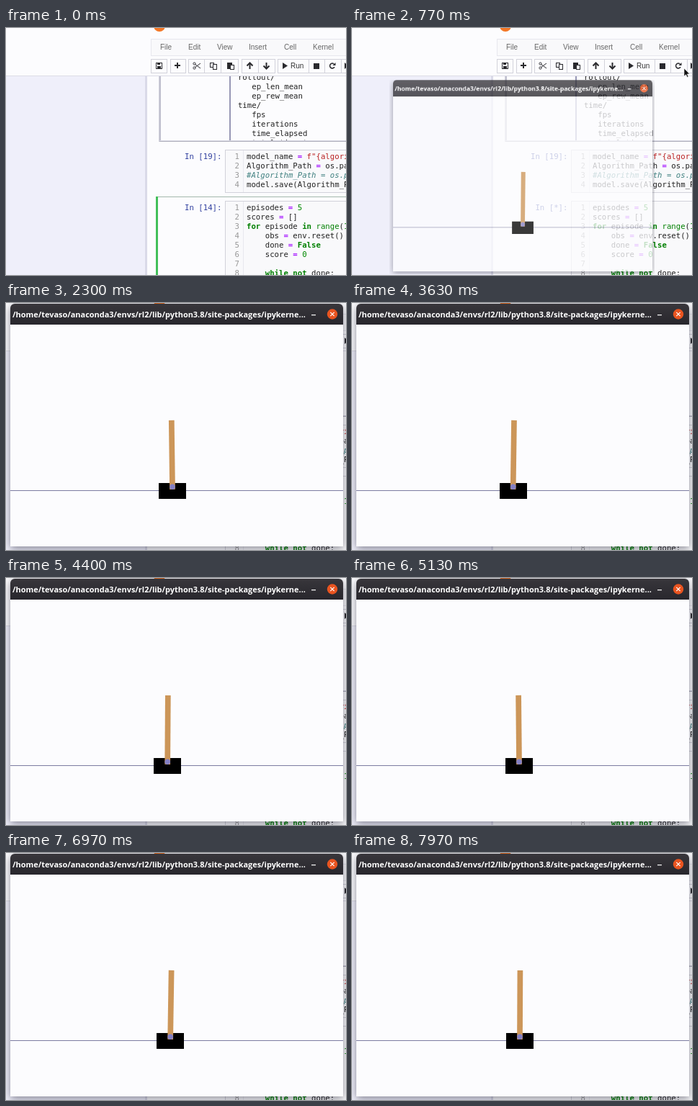
Animation, 472 px wide and 343 px high, one loop 8 s. Source, as an HTML page with a canvas:

```html
<!DOCTYPE html>
<html lang="en">
<head>
<meta charset="utf-8">
<title>Cart and pole</title>
<style>
html, body { margin: 0; width: 100%; height: 100%; overflow: hidden; background: #fcfcfe; }
canvas { display: block; }
</style>
</head>
<body>
<canvas id="stage" width="472" height="343"></canvas>
<script>
const W = 472, H = 343, LOOP = 8000;
const RUN_AT = 500, OPEN_AT = 738.5, OPEN_TIME = 150;
const MONO = '"DejaVu Sans Mono", monospace';
const SANS = '"Liberation Sans", Arial, sans-serif';
const PAPER = '#fcfcfe';
const TITLE = '/home/tevaso/anaconda3/envs/rl2/lib/python3.8/site-packages/ipykerne...';

const stage = document.getElementById('stage').getContext('2d');
const layer = document.createElement('canvas');
layer.width = W;
layer.height = H;
const win = layer.getContext('2d');

// time, cart centre, sideways offset of the pole tip
const POSES = [
  [737, 237, 0.9], [830, 237, 0.8], [1500, 234, 0], [2300, 231, -1.2],
  [3330, 227.2, 0], [3630, 223.7, 1.3], [4050, 222.2, 1], [4600, 226, 0.3],
  [5130, 232, -0.9], [5600, 235, -1], [5870, 234.6, -0.8], [6300, 228, 0],
  [6600, 225.5, 1.2], [6970, 228.2, 1.4], [7400, 233.5, -0.3], [7970, 233, 0.4]
];

const CODE_A = [
  'model_name = f"{algorithm}"',
  'Algorithm_Path = os.path.join(',
  '#Algorithm_Path = os.path',
  'model.save(Algorithm_Path)'
];
const CODE_B = [
  'episodes = 5', 'scores = []', 'for episode in range(1, ',
  '    obs = env.reset()', '    done = False', '    score = 0', '',
  '    while not done:'
];
const OUTPUT = ['rollout/', '   ep_len_mean', '   ep_rew_mean', 'time/', '   fps',
  '   iterations', '   time_elapsed', '   total_timesteps'];

function rect(c, x, y, w, h, color) {
  c.fillStyle = color;
  c.fillRect(x, y, w, h);
}

function frame(c, x, y, w, h, color) {
  c.strokeStyle = color;
  c.lineWidth = 1;
  c.strokeRect(x + 0.5, y + 0.5, w, h);
}

function disc(c, x, y, r, color) {
  c.fillStyle = color;
  c.beginPath();
  c.arc(x, y, r, 0, Math.PI * 2);
  c.fill();
}

function text(c, str, x, y, font, color) {
  c.font = font;
  c.fillStyle = color;
  c.fillText(str, x, y);
}

function poly(c, points, color) {
  c.fillStyle = color;
  c.beginPath();
  for (const [x, y] of points) c.lineTo(x, y);
  c.fill();
}

function line(c, points, color, width) {
  c.strokeStyle = color;
  c.lineWidth = width;
  c.beginPath();
  for (const [x, y] of points) c.lineTo(x, y);
  c.stroke();
}

function tokenStyle(token) {
  if (token[0] === '#') return ['italic ', '#408080'];
  if (/^f?"/.test(token)) return ['', '#ba2121'];
  if (/^(for|in|while|not|False)$/.test(token)) return ['bold ', '#008000'];
  if (token === 'range') return ['', '#008000'];
  if (token === '=') return ['bold ', '#aa22ff'];
  if (/^\d/.test(token)) return ['', '#008800'];
  return ['', '#222'];
}

function codeLine(str, x, y) {
  const step = 6.43;
  for (const m of str.matchAll(/#.*|f"[^"]*"|\w+|[^\s\w]/g)) {
    const [weight, color] = tokenStyle(m[0]);
    text(stage, m[0], x + m.index * step, y, weight + '10.7px ' + MONO, color);
  }
}

function codeCell(label, lines, top, height) {
  const font = '10.7px ' + MONO;
  rect(stage, 304, top, 180, height, '#f9f9fb');
  frame(stage, 304, top, 180, height, '#d2d2da');
  rect(stage, 329, top + 1, 1, height - 1, '#e8e8ee');
  text(stage, label, 248, top + 13, font, '#303f9f');
  lines.forEach((str, i) => {
    const y = top + 13 + i * 13;
    text(stage, i + 1, 317.5, y, font, '#999');
    codeLine(str, 334, y);
  });
}

function toolbar() {
  const ink = '#2a2a2e', c = stage;
  const buttons = [[201, 22], [228, 21], [253, 22], [275, 23], [298, 24], [327, 23],
    [350, 23], [377, 43], [420, 22], [442, 23], [465, 23]];
  for (const [x, w] of buttons) {
    rect(c, x, 43, w, 19, PAPER);
    frame(c, x, 43, w, 19, '#d2d2da');
  }
  // save, add
  frame(c, 208, 48, 8, 8, ink);
  rect(c, 210, 48, 4, 3, ink);
  rect(c, 210, 53, 5, 3, ink);
  rect(c, 234, 51, 8, 2, ink);
  rect(c, 237, 48, 2, 8, ink);
  // cut
  line(c, [[262, 50], [270, 56]], ink, 1);
  line(c, [[262, 55], [270, 49]], ink, 1);
  for (const y of [49.5, 55.5]) {
    c.beginPath();
    c.arc(261.5, y, 1.6, 0, 7);
    c.stroke();
  }
  // copy, paste
  frame(c, 283, 48, 5, 6, ink);
  rect(c, 287, 50, 6, 8, PAPER);
  frame(c, 287, 50, 5, 7, ink);
  rect(c, 307, 48, 7, 9, ink);
  rect(c, 311, 51, 6, 7, PAPER);
  frame(c, 311, 51, 5, 6, ink);
  // arrows
  for (const [x, dir] of [[338.5, 1], [361.5, -1]]) {
    line(c, [[x, 52.5 + 4.5 * dir], [x, 52.5 - 3 * dir]], ink, 2);
    line(c, [[x - 4, 52.5], [x, 52.5 - 4 * dir], [x + 4, 52.5]], ink, 2);
  }
  // run, stop, restart, forward
  poly(c, [[384, 48], [384, 57], [391, 52.5]], ink);
  text(c, 'Run', 395, 56, '10px ' + SANS, '#333');
  rect(c, 427, 49, 8, 8, ink);
  c.strokeStyle = ink;
  c.lineWidth = 1.5;
  c.beginPath();
  c.arc(453, 52.5, 3.4, 0.5, 5.4);
  c.stroke();
  poly(c, [[457.5, 48], [457.5, 52], [453.5, 52]], ink);
  poly(c, [[470, 48], [470, 57], [475, 52.5]], ink);
}

function page(running) {
  const c = stage, font = '10.7px ' + MONO;
  rect(c, 0, 0, W, H, PAPER);
  rect(c, 0, 66, 196, H, '#efeffa');
  rect(c, 193, 67, 3, H, '#dadae8');

  OUTPUT.forEach((str, i) => text(c, str, 321.9, 72 + i * 13, font, '#222'));
  rect(c, 310.5, 66, 1, 92, '#34346c');
  rect(c, 196, 158, 276, 12, PAPER);
  rect(c, 212, 66, 1, 92, '#d0d0da');
  rect(c, 213, 66, 2, 92, '#c0c0ce');
  rect(c, 213, 156, 260, 1, '#d8d8e4');
  rect(c, 213, 157, 260, 1, '#b0b0bc');

  rect(c, 196, 0, 276, 66, PAPER);
  disc(c, 213, -3, 8, '#f37726');
  rect(c, 201, 15, 271, 23, '#f9f9fb');
  frame(c, 201, 15, 280, 23, '#e7e7ee');
  const menu = [['File', 214], ['Edit', 253], ['View', 293], ['Insert', 337],
    ['Cell', 386], ['Kernel', 426]];
  for (const [name, x] of menu) text(c, name, x, 30, '10px ' + SANS, '#666');
  toolbar();
  rect(c, 0, 66, W, 1, '#dcdce6');

  codeCell('In [19]:', CODE_A, 169, 59);
  if (!running) {
    rect(c, 208, 234, 264, 1, '#a3b8ac');
    rect(c, 208, 234, 3, H, '#42c05a');
  }
  codeCell(running ? ' In [*]:' : 'In [14]:', CODE_B, 240, 120);
}

// Cubic through the poses, slopes taken from the neighbours
function pose(t, k) {
  const last = POSES.length - 1;
  if (t <= POSES[0][0]) return POSES[0][k];
  if (t >= POSES[last][0]) return POSES[last][k];
  const i = POSES.findIndex(p => p[0] > t) - 1;
  const slope = n => {
    const a = POSES[Math.max(n - 1, 0)], b = POSES[Math.min(n + 1, last)];
    return (b[k] - a[k]) / (b[0] - a[0]);
  };
  const a = POSES[i], b = POSES[i + 1], d = b[0] - a[0], u = (t - a[0]) / d;
  const u2 = u * u, u3 = u2 * u;
  return a[k] * (2 * u3 - 3 * u2 + 1) + b[k] * (3 * u2 - 2 * u3) +
    d * slope(i) * (u3 - 2 * u2 + u) + d * slope(i + 1) * (u3 - u2);
}

function cartPole(t) {
  const x = pose(t, 1), lean = pose(t, 2);
  rect(win, 6, 260, 462, 1, '#7c7ca2');
  rect(win, Math.round(x - 19), 250, 38, 22, '#000');
  win.save();
  win.translate(x, 255.2);
  win.rotate(Math.atan2(lean, 92));
  rect(win, -3.85, -92.3, 7.7, 96, '#cc9659');
  win.restore();
  disc(win, x, 255.2, 3.8, '#8480c4');
}

function titleBar() {
  const shade = win.createLinearGradient(0, 1, 0, 30);
  shade.addColorStop(0, '#38363b');
  shade.addColorStop(1, '#28272d');
  win.fillStyle = shade;
  win.beginPath();
  win.roundRect(6, 1, 462, 29, [6, 6, 0, 0]);
  win.fill();
  text(win, TITLE, 9, 20, 'bold 10.94px "Open Sans", sans-serif', '#fff');
  rect(win, 424, 16, 6, 1.3, '#eee');
  disc(win, 453, 15.5, 7.2, '#e95420');
  line(win, [[450.3, 12.8], [455.7, 18.2]], '#fff', 1.2);
  line(win, [[455.7, 12.8], [450.3, 18.2]], '#fff', 1.2);
}

function appWindow(t) {
  const u = Math.min((t - OPEN_AT) / OPEN_TIME, 1);
  if (u <= 0) return;
  const p = u < 1 ? 1 - 2 ** (-10 * u) : 1;

  win.clearRect(0, 0, W, H);
  win.save();
  win.shadowColor = 'rgba(20, 20, 40, 0.5)';
  win.shadowBlur = 12;
  win.shadowOffsetY = 3;
  win.fillStyle = PAPER;
  win.beginPath();
  win.roundRect(6, 1, 462, 337, [6, 6, 0, 0]);
  win.fill();
  win.restore();
  titleBar();
  cartPole(t);

  // grows from the middle of its lower edge
  stage.save();
  stage.globalAlpha = p;
  stage.translate(237, 338);
  stage.scale(0.01 + 0.99 * p, 0.05 + 0.95 * p);
  stage.drawImage(layer, -237, -338);
  stage.restore();
}

function pointer(t) {
  if (t < 450 || t > 1750) return;
  const away = Math.max(0, 1 - (t - 450) / 250) + Math.max(0, (t - 1500) / 250);
  const x = 461 + 14 * away, y = 56 + 8 * away;
  const shape = [[0, 0], [0, 11], [2.6, 8.7], [4.4, 12.4], [6, 11.6], [4.3, 8], [7.6, 7.8], [0, 0]]
    .map(([a, b]) => [x + a, y + b]);
  poly(stage, shape, '#111');
  line(stage, shape, '#fff', 0.6);
}

function draw(now) {
  const t = now % LOOP;
  page(t >= RUN_AT);
  appWindow(t);
  pointer(t);
}

const start = performance.now();
function tick() {
  draw(performance.now() - start);
  requestAnimationFrame(tick);
}
tick();
</script>
</body>
</html>
```
